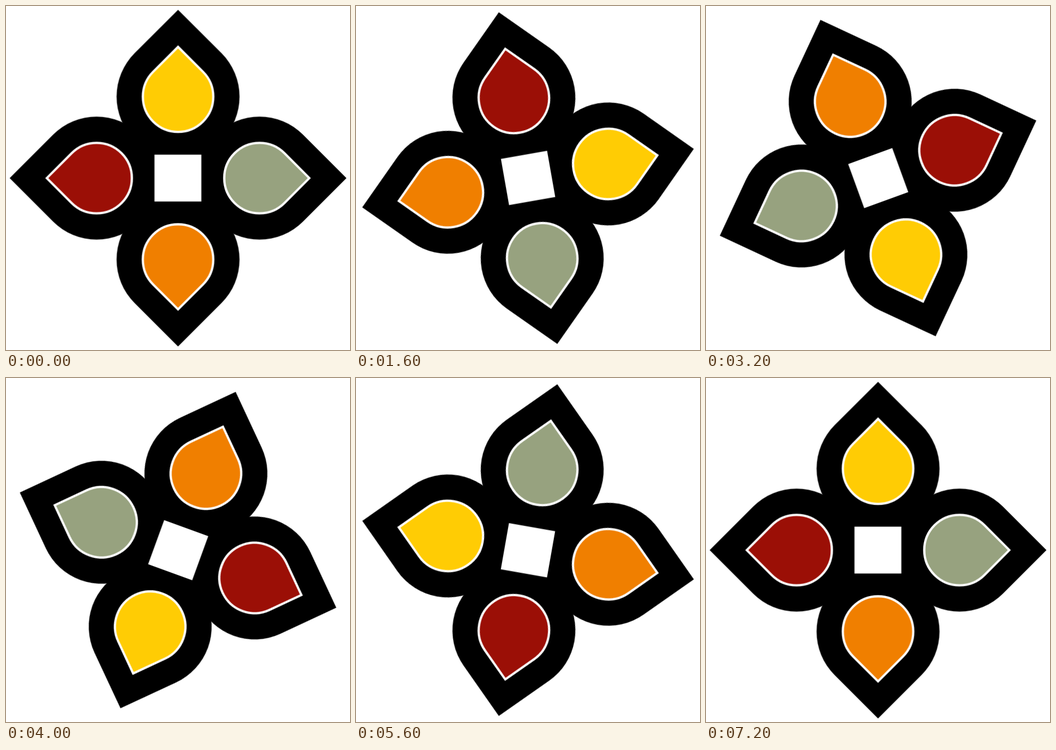
An HTML page for the animation above (7300 ms loop, 631 by 631 pixels).

```html
<!DOCTYPE html>
<html lang="en">
<head>
<meta charset="utf-8">
<title>Turning flower</title>
<style>
  html, body {
    margin: 0;
    width: 100%;
    height: 100%;
    overflow: hidden;
    background: #fff;
  }
  svg {
    display: block;
    width: 631px;
    height: 631px;
  }
  /* 73 poses, 5 degrees apart: 0 to 360 inclusive */
  .flower {
    transform-origin: 0 0;
    animation: turn 7300ms steps(73, end) infinite;
  }
  @keyframes turn {
    from { transform: rotate(0deg); }
    to { transform: rotate(365deg); }
  }
  .drop {
    stroke: #fff;
    stroke-width: 4.1;
    stroke-linejoin: miter;
  }
</style>
</head>
<body>
<svg viewBox="0 0 631 631">
  <defs>
    <path id="petal" d="M0-159.45 79.73-79.73A112.75 112.75 0 1 1-79.73-79.73Z"/>
    <path id="drop" class="drop" d="M0-91.36 45.68-45.68A64.6 64.6 0 1 1-45.68-45.68Z"/>
  </defs>
  <g transform="translate(315.6 315.7)">
    <g class="flower">
      <rect x="-60" y="-60" width="120" height="120"/>
      <g transform="translate(0 -149.4)">
        <use href="#petal"/>
        <use href="#drop" fill="#ffcc04"/>
      </g>
      <g transform="rotate(90) translate(0 -149.4)">
        <use href="#petal"/>
        <use href="#drop" fill="#97a27f"/>
      </g>
      <g transform="rotate(180) translate(0 -149.4)">
        <use href="#petal"/>
        <use href="#drop" fill="#f07f00"/>
      </g>
      <g transform="rotate(270) translate(0 -149.4)">
        <use href="#petal"/>
        <use href="#drop" fill="#9b0f06"/>
      </g>
      <rect x="-43.3" y="-43.1" width="86" height="86" fill="#fff"/>
    </g>
  </g>
</svg>
</body>
</html>
```
